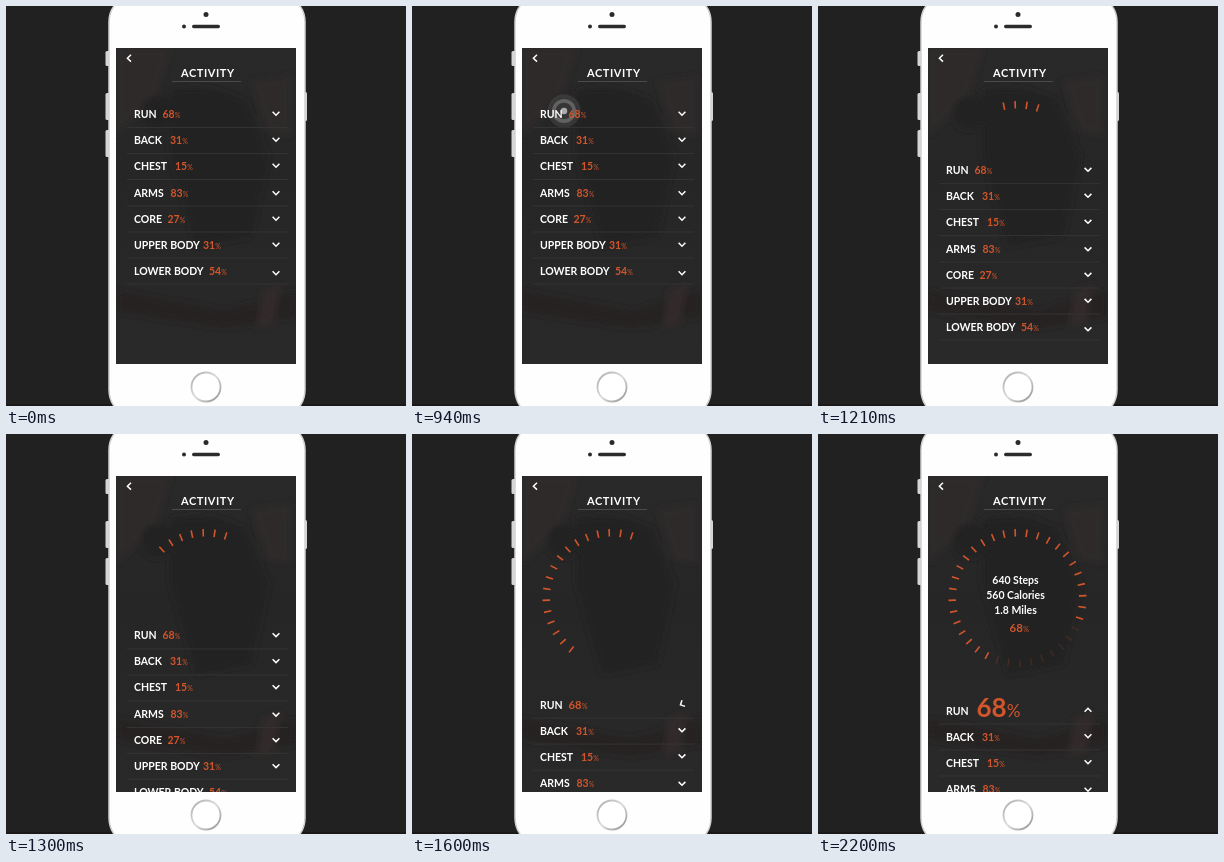
Recreate the animation shown at these times as an HTML page. Size 400x400 px, loop 3.22 s.

```html
<!DOCTYPE html>
<html lang="en">
<head>
<meta charset="utf-8">
<title>Activity</title>
<style>
  html, body { margin: 0; width: 100%; height: 100%; overflow: hidden; background: #212121; }
  svg { display: block; width: 100%; height: 100%; }
  text { font: 700 10.5px Lato, "Open Sans", sans-serif; fill: #fff; }
  .pct { fill: #d2562c; }
  .pct tspan { font-size: .66em; font-weight: 400; }
  .chevron { fill: none; stroke: #fff; stroke-width: 1.5; }
  .mid { text-anchor: middle; }
</style>
</head>
<body>
<svg viewBox="0 0 400 400">
  <defs>
    <clipPath id="screen"><rect x="110" y="42" width="180" height="316"/></clipPath>
    <linearGradient id="shade" x2="0" y2="1">
      <stop offset="0" stop-color="#2a2929"/>
      <stop offset=".4" stop-color="#272626"/>
      <stop offset="1" stop-color="#2a2929"/>
    </linearGradient>
    <linearGradient id="metal" x2="1" y2="1">
      <stop offset="0" stop-color="#aaa"/>
      <stop offset=".5" stop-color="#ddd"/>
      <stop offset="1" stop-color="#8d8d8d"/>
    </linearGradient>
    <filter id="soft"><feGaussianBlur stdDeviation="3"/></filter>
  </defs>

  <rect width="400" height="400" fill="#212121"/>
  <rect y="398" width="400" height="2" fill="#1b1819"/>
  <g fill="#d6d6d6">
    <rect x="99.5" y="45" width="5" height="15" rx="1.5"/>
    <rect x="99.5" y="87" width="5" height="27" rx="1.5"/>
    <rect x="99.5" y="124" width="5" height="27" rx="1.5"/>
    <rect x="297" y="86" width="4" height="29" rx="1.5"/>
  </g>
  <rect x="103" y="-12" width="196" height="424" rx="28" fill="#fefefe" stroke="#d2d2d2" stroke-width="1.5"/>
  <g fill="#2b2b2b">
    <circle cx="200" cy="8.5" r="2.5"/>
    <circle cx="178" cy="20.5" r="2"/>
    <rect x="186" y="18.8" width="28" height="3.4" rx="1.7"/>
  </g>
  <circle cx="200" cy="381" r="14.5" fill="#fff" stroke="url(#metal)" stroke-width="1.8"/>

  <rect x="110" y="42" width="180" height="316" fill="url(#shade)"/>
  <g clip-path="url(#screen)">
    <g filter="url(#soft)">
      <path d="M110 42H165L150 90 110 130Z" fill="#2d2b2b"/>
      <path d="M165 85Q200 75 240 95L262 150 245 230 190 240 165 150Z" fill="#242323"/>
      <circle cx="152" cy="107" r="17" fill="#242323"/>
      <path d="M245 75L285 70V130L262 125Z" fill="#2d2b2b"/>
      <path d="M110 285L220 305 290 285V310L220 322 110 305Z" fill="#252424"/>
      <path d="M257 284L275 278 268 318 250 322Z" fill="#312c2a"/>
    </g>
    <path d="M125 48.8L121.4 52.2 125 55.6" class="chevron"/>
    <text x="175" y="71" style="font-size:11px;letter-spacing:.55px">ACTIVITY</text>
    <path d="M166 75.5H235" stroke="#4b4a4a"/>

    <g id="tap" fill="none" stroke="#b9b9b9">
      <circle r="18" fill="#999" fill-opacity=".25" stroke="none"/>
      <circle r="11" stroke-width="4" stroke-opacity=".5"/>
      <circle r="3.5" fill="#e6e6e6" stroke="none"/>
    </g>
    <g id="dial" stroke="#d2562c" stroke-width="1.6"></g>
    <g id="stats">
      <text class="mid" x="197.5" y="150">640 Steps</text>
      <text class="mid" x="197.5" y="165">560 Calories</text>
      <text class="mid" x="197.5" y="180">1.8 Miles</text>
    </g>
    <text id="share" class="mid pct" x="201.3" y="197.5" style="font-size:11.5px">68<tspan>%</tspan></text>
    <g id="list"></g>
  </g>
</svg>
<script>
const LOOP = 3220, START = 730, END = 2200, STEP = 30;
const TICKS = 36, DROP = 168.5;
const rows = [
  // label, percent, percent x, centre y, chevron y
  ["RUN", 68, 156.5, 108, 107.5],
  ["BACK", 31, 164, 134, 133.5],
  ["CHEST", 15, 169, 160, 159.5],
  ["ARMS", 83, 164.5, 186.5, 187],
  ["CORE", 27, 161.5, 212.5, 212.5],
  ["UPPER BODY", 31, 197, 238.5, 238.5],
  ["LOWER BODY", 54, 203, 264.5, 267]
];

const $ = id => document.getElementById(id);
const set = (el, attrs) => {
  for (const key in attrs) el.setAttribute(key, attrs[key]);
  return el;
};
const add = (parent, tag, attrs, text = "") => {
  const el = set(document.createElementNS("http://www.w3.org/2000/svg", tag), attrs);
  el.textContent = text;
  return parent.appendChild(el);
};
const ramp = (t, from, to) => Math.min(1, Math.max(0, (t - from) / (to - from)));
const smooth = p => p * p * (3 - 2 * p);
const mix = (a, b, p) => a + (b - a) * p;

// cubic-bezier(x1, 0, x2, 1)
function ease(p, x1, x2) {
  let lo = 0, hi = 1;
  for (let i = 0; i < 24; i++) {
    const s = (lo + hi) / 2, r = 1 - s;
    if (3 * r * r * s * x1 + 3 * r * s * s * x2 + s ** 3 < p) lo = s;
    else hi = s;
  }
  return smooth(lo);
}

const items = rows.map(([label, value, x, y, arrowY]) => {
  add($("list"), "text", { x: 128, y: y + 4 }, label);
  const pct = add($("list"), "text", { x, y: y + 4, class: "pct" }, value);
  add(pct, "tspan", {}, "%");
  const arrow = add($("list"), "path", {
    d: "M-3.4 -1.7L0 1.7 3.4 -1.7", class: "chevron", transform: `translate(270 ${arrowY})`
  });
  add($("list"), "path", { d: `M121 ${y + 13.5}H282`, stroke: "#343333" });
  return { pct, arrow };
});

const ticks = Array.from({ length: TICKS }, (_, i) =>
  add($("dial"), "path", { d: "M0 -61.5V-69", transform: `translate(199.5 164) rotate(${18 - i * 10})` }));

function tickAlpha(i, t) {
  if (i < 18 || i > 26) return 1;
  return i < 20 ? mix(.5, .18, ramp(t, 1960, 2170)) : .15;
}

function draw(t) {
  const press = smooth(ramp(t, START, 1000));
  set($("tap"), {
    transform: `translate(152 105) scale(${mix(.4, 1, press)})`,
    opacity: press * (1 - ramp(t, 1030, 1180)) * .8
  });

  set($("list"), { transform: `translate(0 ${DROP * ease(ramp(t, 1009, 1735), .25, .4)})` });

  const grow = smooth(ramp(t, 1560, 1860));
  const { pct, arrow } = items[0];
  pct.style.fontSize = mix(10.5, 26, grow) + "px";
  set(pct, { x: mix(156.5, 158.5, grow), y: mix(112, 114, grow) });
  const flip = smooth(ramp(t, 1500, 1750));
  set(arrow, { transform: `translate(270 107.5) rotate(${180 * flip})` });

  const drawn = (t - 1100) * .0325;
  ticks.forEach((tick, i) => set(tick, { opacity: drawn >= i ? tickAlpha(i, t) : 0 }));

  set($("stats"), { opacity: ramp(t, 1850, 2150) });
  set($("share"), { opacity: ramp(t, 1890, 2200) });
}

function frame(now) {
  const t = now % LOOP;
  const stepped = t < START ? 0 : START + Math.floor((t - START) / STEP) * STEP;
  draw(Math.min(stepped, END));
  requestAnimationFrame(frame);
}

draw(0);
const begin = performance.now();
requestAnimationFrame(function tick() {
  frame.call(null, 0);
});
</script>
</body>
</html>
```
